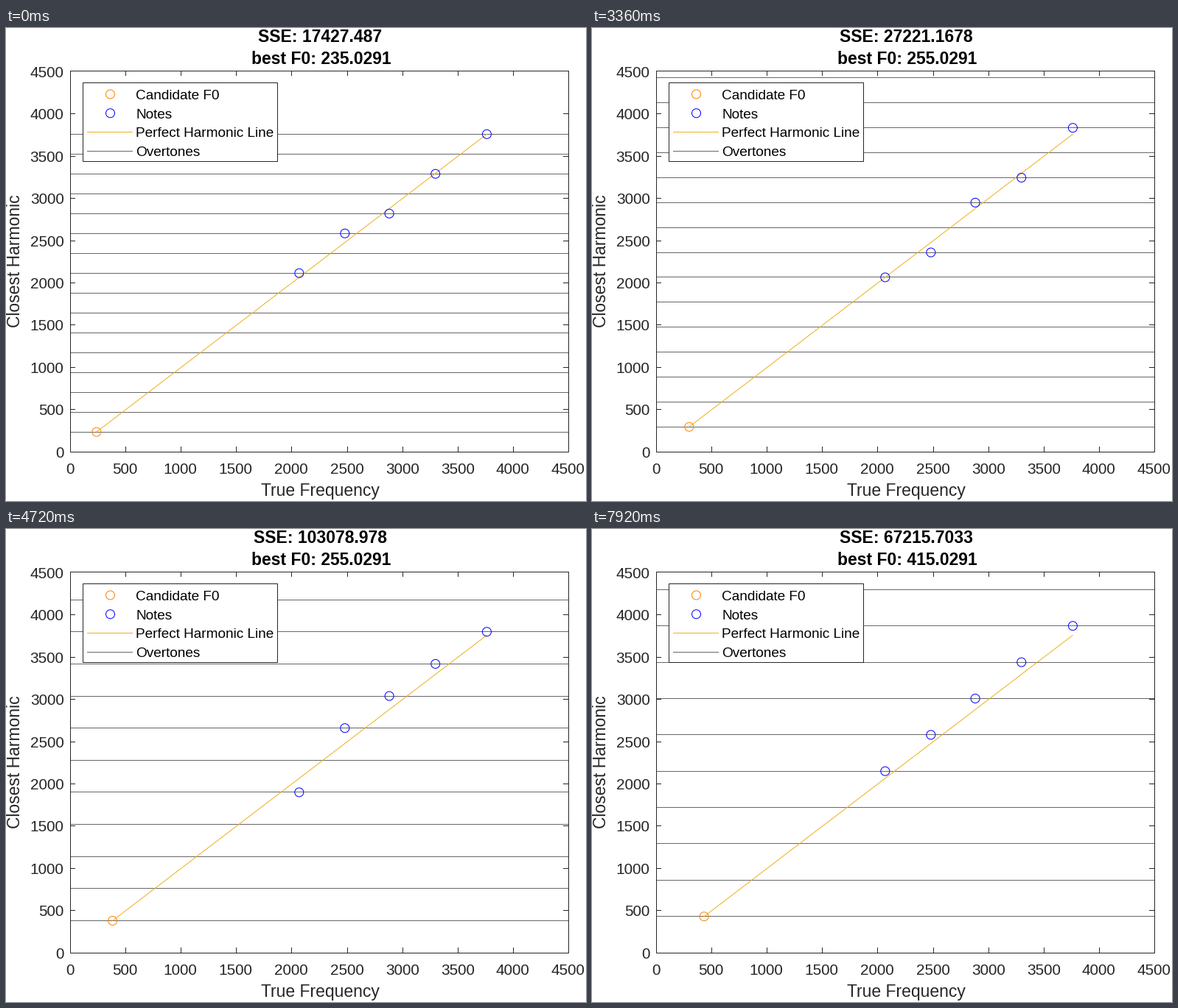
A matplotlib script that plays this animation: 787 px wide and 643 px high, repeating every 8 s.

```python
import numpy as np
import matplotlib.pyplot as plt
from matplotlib.animation import FuncAnimation
from matplotlib.collections import LineCollection
from matplotlib.patches import Circle, Rectangle

WIDTH, HEIGHT, DPI = 787, 643, 100
PX = 72 / DPI                       # one pixel in points
LEFT, RIGHT, TOP, BOTTOM = 87, 763, 58, 576
Y_ZERO, Y_SPAN = 576.1, 516.7       # data scale inside the frame
LIMIT, TICK_STEP, TICK_LENGTH = 4500, 500, 7
INK, GRAY = "#262626", "#676767"
ORANGE, BLUE, GOLD = "#ff8000", "#0000ff", "#edb120"

NOTES = np.array([2065.63672174, 106575 / 43, 2879.62303078,
                  3296.61009003, 161700 / 43])
FIRST, STEP, COUNT = NOTES[-1] / 16, 5, 40
OVERTONES = np.arange(1, 17)
HOLD = 16                           # frames spent on each new best candidate


def x_pos(value):
    return LEFT + 0.5 + value * (RIGHT - LEFT) / LIMIT


def y_pos(value):
    return Y_ZERO - value * Y_SPAN / LIMIT


def snap(position):
    return np.floor(position) + 0.5


def closest_harmonics(candidate):
    return np.round(NOTES / candidate) * candidate


def build_timeline():
    """One (candidate, error, best) entry per frame, pausing on every new best."""
    timeline, best, best_error = [], None, np.inf
    for candidate in FIRST + STEP * np.arange(COUNT):
        error = np.sum((NOTES - closest_harmonics(candidate)) ** 2)
        improved = error < best_error
        if improved:
            best, best_error = candidate, error
        timeline += [(candidate, error, best)] * (HOLD if improved else 1)
    return timeline


def trimmed(value):
    return f"{value:.4f}".rstrip("0").rstrip(".")


plt.rcParams["font.family"] = "Liberation Sans"
fig = plt.figure(figsize=(WIDTH / 100, HEIGHT / 100), dpi=DPI, facecolor="white")
ax = fig.add_axes([0, 0, 1, 1])
ax.set_xlim(0, WIDTH)
ax.set_ylim(HEIGHT, 0)
ax.axis("off")


def write(x, y, text, size, color=INK, ha="center", **style):
    return ax.text(x, y, text, fontsize=size * PX, color=color, ha=ha,
                   va="baseline", rotation_mode="anchor", zorder=7, **style)


def stroke(xs, ys, color, zorder):
    line, = ax.plot(xs, ys, color=color, lw=PX, zorder=zorder,
                    solid_capstyle="butt")
    line.set_snap(False)
    return line


def ring(x, y, color, zorder=3):
    circle = Circle((x, y), 6, fill=False, ec=color, lw=PX, zorder=zorder)
    circle.set_snap(False)
    return ax.add_patch(circle)


def box(x0, y0, x1, y1, fill, zorder):
    frame = Rectangle((x0 + 0.5, y0 + 0.5), x1 - x0, y1 - y0, fc=fill, ec=INK,
                      lw=PX, zorder=zorder, joinstyle="miter")
    frame.set_snap(False)
    ax.add_patch(frame)


def draw_axes():
    box(LEFT, TOP, RIGHT, BOTTOM, "none", 4)
    for value in range(0, LIMIT + 1, TICK_STEP):
        x, y = snap(x_pos(value)), snap(y_pos(value))
        stroke([x, x], [BOTTOM, BOTTOM - TICK_LENGTH], INK, 4)
        stroke([x, x], [TOP, TOP + TICK_LENGTH], INK, 4)
        if 0 < value < LIMIT:
            stroke([LEFT, LEFT + TICK_LENGTH], [y, y], INK, 4)
            stroke([RIGHT, RIGHT - TICK_LENGTH], [y, y], INK, 4)
        write(x - 0.8, 606, str(value), 20.8)
        write(78.5, y + 7.5, str(value), 20.8, ha="right")
    write(426, 636, "True Frequency", 22.9)
    write(19, 317, "Closest Harmonic", 22.9, rotation=90)


def draw_legend():
    box(104, 74, 368, 181, "white", 5)
    ring(141.5, 90, ORANGE, 6)
    ring(141.5, 115.8, BLUE, 6)
    stroke([110, 172], [141.5, 141.5], GOLD, 6)
    stroke([110, 172], [167.5, 167.5], GRAY, 6)
    labels = ["Candidate F0", "Notes", "Perfect Harmonic Line", "Overtones"]
    for baseline, label in zip((97, 123, 148, 174), labels):
        write(176, baseline, label, 19, "black", ha="left")


draw_axes()
draw_legend()
error_title = write(426, 19, "", 22.9, "black", weight="bold")
best_title = write(428, 49, "", 22.9, "black", weight="bold")
overtone_lines = LineCollection([], colors=GRAY, linewidths=PX, zorder=1)
overtone_lines.set_snap(False)
ax.add_collection(overtone_lines, autolim=False)
harmonic_line = stroke([], [], GOLD, 2)
candidate_ring = ring(0, 0, ORANGE)
note_rings = [ring(0, 0, BLUE) for _ in NOTES]
timeline = build_timeline()


def update(frame):
    candidate, error, best = timeline[frame]
    error_title.set_text(f"SSE: {trimmed(error)}")
    best_title.set_text(f"best F0: {trimmed(best)}")

    levels = OVERTONES * candidate
    rows = snap(y_pos(levels[levels < LIMIT]))
    overtone_lines.set_segments([[(LEFT + 1, y), (RIGHT, y)] for y in rows])

    ends = np.array([candidate, NOTES[-1]])
    harmonic_line.set_data(x_pos(ends), y_pos(ends))
    candidate_ring.center = x_pos(candidate), y_pos(candidate)
    for circle, note, level in zip(note_rings, NOTES, closest_harmonics(candidate)):
        circle.center = x_pos(note), y_pos(level)


animation = FuncAnimation(fig, update, frames=len(timeline), interval=80,
                          repeat=True, repeat_delay=0)
plt.show()
```
